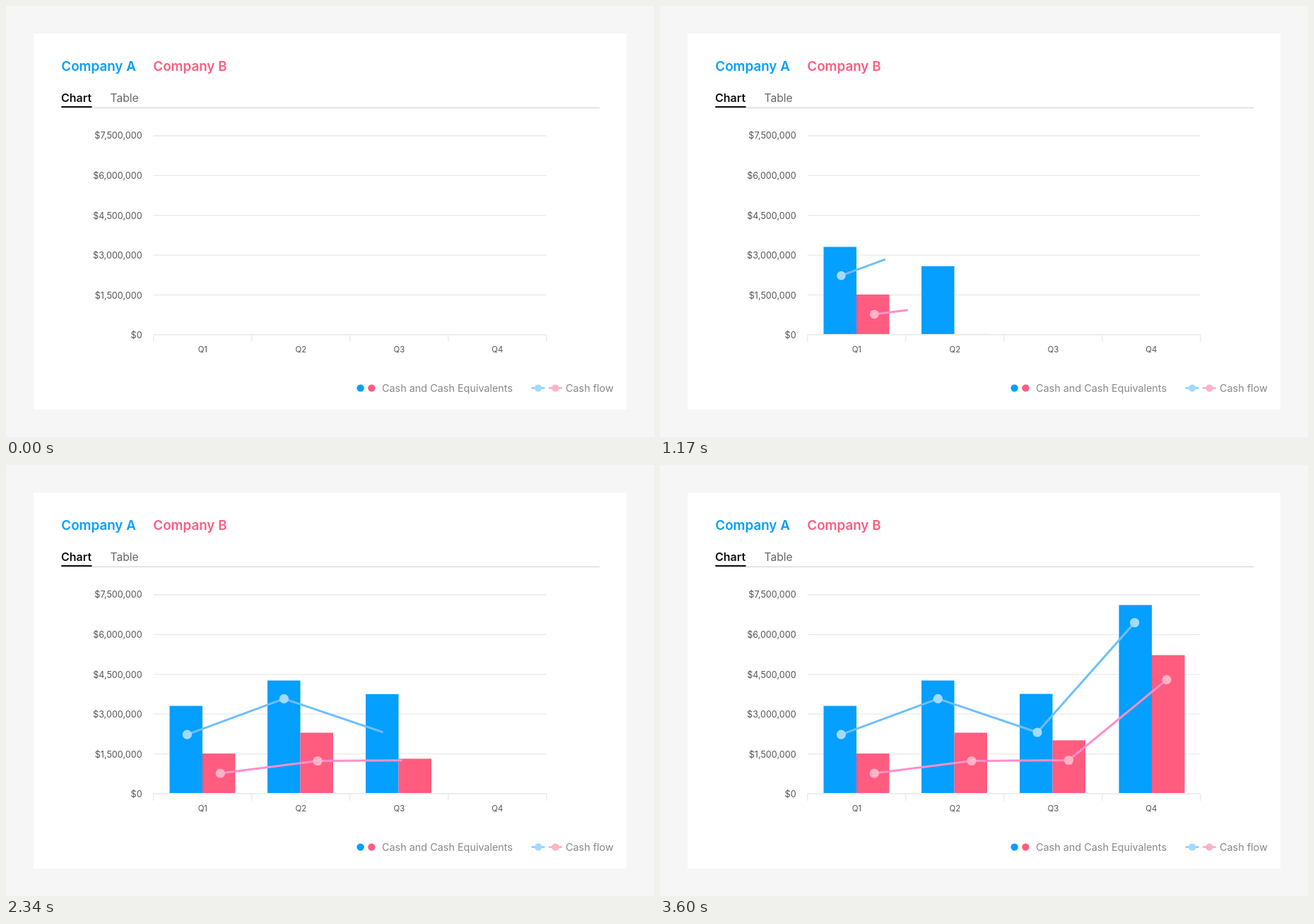
Write an HTML page that moves like this. It is 917 px wide and 611 px high and loops after 5610 ms.

```html
<!DOCTYPE html>
<html lang="en">
<head>
<meta charset="utf-8">
<title>Company comparison chart</title>
<style>
  html, body { margin: 0; width: 100%; height: 100%; overflow: hidden; background: #f6f6f6; }
  svg { display: block; width: 100%; height: 100%; font-family: Inter, "Open Sans", sans-serif; }
  .company { font-size: 18.8px; font-weight: 600; }
  .tab { font-size: 15.6px; fill: #666; }
  .tab.on { font-size: 16px; font-weight: 600; fill: #111; }
  .value { font-size: 12.6px; fill: #555; text-anchor: end; }
  .quarter { font-size: 11.4px; fill: #555; text-anchor: middle; }
  .key { font-size: 14.4px; fill: #888; }
  .grid { fill: none; stroke: #e9e9e9; stroke-width: 1.3; }
  .blue { fill: #049fff; }
  .red { fill: #ff5c80; }
  .line { fill: none; stroke-width: 3; }
  .blueLine { stroke: #6ebfff; }
  .redLine { stroke: #ff8fca; }
  .blueDot { fill: #a2dbff; }
  .redDot { fill: #ffb3c5; }
</style>
</head>
<body>
<svg id="stage" viewBox="0 0 917 611">
  <rect x="39" y="39" width="839" height="533" fill="#fefffe"/>
  <text class="company blue" x="78.3" y="92">Company A</text>
  <text class="company red" x="208.3" y="92">Company B</text>
  <text class="tab on" x="78" y="135.7">Chart</text>
  <text class="tab" x="147.5" y="135.7">Table</text>
  <path d="M78 144.4H840" stroke="#d6d6d6" stroke-width="1.3"/>
  <path d="M78.3 143H121.5" stroke="#111" stroke-width="2"/>

  <g id="axes"></g>
  <g id="bars"></g>
  <g id="lines"></g>
  <g id="dots"></g>

  <circle class="blue" cx="501.6" cy="541.6" r="5.2"/>
  <circle class="red" cx="517.4" cy="541.6" r="5.2"/>
  <text class="key" x="532" y="546.8">Cash and Cash Equivalents</text>
  <path class="blueLine" d="M743.8 541.6h18.7" stroke-width="2"/>
  <circle class="blueDot" cx="753.2" cy="541.6" r="5.2"/>
  <path class="redLine" d="M768 541.6h18.8" stroke-width="2"/>
  <circle class="redDot" cx="777.4" cy="541.6" r="5.2"/>
  <text class="key" x="792" y="546.8">Cash flow</text>
</svg>
<script>
const LOOP = 5610, STEP = 30, BASE = 465, BAR_W = 46.5, DOT_R = 6.6;
const BAR_TIME = 600, BAR_GAP = 886, DOT_TIME = 290;

const groupX = [231.5, 370, 509, 649.5];
const series = [
  {
    name: "blue", barShift: 0, barStart: 0,
    tops: [341.5, 305.5, 324.5, 198.5],
    points: [[256.4, 382.2], [393.4, 331.4], [534, 379], [671.6, 223.5]],
    spans: [[915, 1457], [1500, 2400], [2390, 3290]],
    dotStarts: [915, 1460, 2400, 3295]
  },
  {
    name: "red", barShift: BAR_W, barStart: 269,
    tops: [409, 379.5, 390.3, 269.5],
    points: [[303.3, 437], [441, 419.5], [578.4, 418.5], [717, 304.3]],
    spans: [[915, 1561], [1810, 2494], [2745, 3345]],
    dotStarts: [915, 1560, 2500, 3310]
  }
];

function add(parent, tag, attrs, text) {
  const el = document.createElementNS("http://www.w3.org/2000/svg", tag);
  for (const key in attrs) el.setAttribute(key, attrs[key]);
  if (text) el.textContent = text;
  document.getElementById(parent).append(el);
  return el;
}

// Eased value for control points (x1, 0) and (x2, 1).
function bezier(x1, x2) {
  return x => {
    let lo = 0, hi = 1;
    for (let i = 0; i < 24; i++) {
      const t = (lo + hi) / 2, s = 1 - t;
      if (3 * s * s * t * x1 + 3 * s * t * t * x2 + t * t * t < x) lo = t; else hi = t;
    }
    return lo * lo * (3 - 2 * lo);
  };
}
const smooth = u => u * u * (3 - 2 * u);
const easeBar = bezier(0.45, 0.35);
const easeGlide = bezier(0.333, 0.238);

function progress(time, start, end, ease) {
  const u = (time - start) / (end - start);
  return u <= 0 ? 0 : u >= 1 ? 1 : ease(u);
}

for (let i = 0; i < 6; i++) {
  const y = 466 - i * 56.4;
  const label = "$" + (i * 1500000).toLocaleString("en-US");
  add("axes", "path", { class: "grid", d: `M208.5 ${y}H764.8` });
  add("axes", "text", { class: "value", x: 192.6, y: 471.3 - i * 56.6 }, label);
}
for (let i = 0; i < 5; i++) {
  const x = 208.8 + i * 139;
  add("axes", "path", { class: "grid", d: `M${x} 466V476` });
  if (i < 4) add("axes", "text", { class: "quarter", x: x + 69.5, y: 491.2 }, "Q" + (i + 1));
}

const parts = [];
for (const s of series) {
  s.tops.forEach((top, i) => {
    const start = s.barStart + i * BAR_GAP;
    const bar = add("bars", "rect", { class: s.name, x: groupX[i] + s.barShift, width: BAR_W });
    parts.push(time => {
      const h = (BASE - top) * progress(time, start, start + BAR_TIME, easeBar);
      bar.setAttribute("y", BASE - h);
      bar.setAttribute("height", h);
    });
  });

  const line = add("lines", "path", { class: `line ${s.name}Line` });
  parts.push(time => {
    let d = "";
    s.spans.forEach(([start, end], i) => {
      const ease = end - start > 800 ? easeGlide : smooth;
      const k = progress(time, start, end, ease);
      if (!k) return;
      const [x, y] = s.points[i], [nx, ny] = s.points[i + 1];
      d += `M${x} ${y}L${x + (nx - x) * k} ${y + (ny - y) * k}`;
    });
    line.setAttribute("d", d);
  });

  s.points.forEach(([cx, cy], i) => {
    const start = s.dotStarts[i];
    const dot = add("dots", "circle", { class: s.name + "Dot", cx, cy });
    parts.push(time =>
      dot.setAttribute("r", DOT_R * progress(time, start, start + DOT_TIME, smooth)));
  });
}

function draw(time) {
  const t = Math.floor(time % LOOP / STEP) * STEP;
  for (const update of parts) update(t);
}

const begin = performance.now();
function tick() {
  draw(performance.now() - begin);
  requestAnimationFrame(tick);
}
tick();
</script>
</body>
</html>
```
